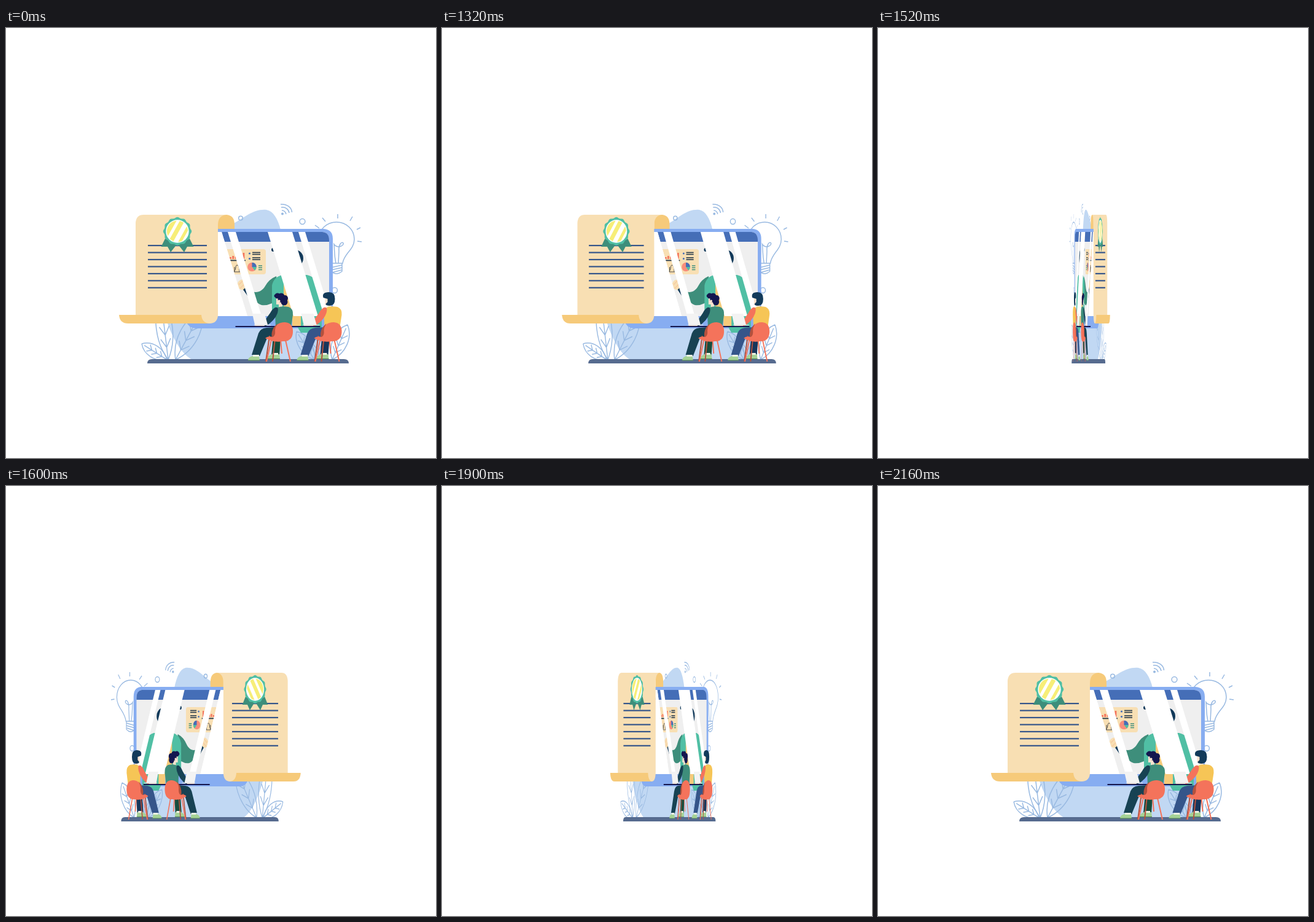
Animation, 700 px wide and 700 px high, one loop 3 s. Source, as an HTML page:

```html
<!DOCTYPE html>
<html lang="en">
<head>
<meta charset="utf-8">
<title>Online certificate</title>
<style>
html, body { margin: 0; width: 100%; height: 100%; overflow: hidden; background: #fff; }
svg { display: block; width: 100vw; height: 100vh; }
</style>
</head>
<body>
<svg viewBox="0 0 700 700"><g id="scene"></g></svg>
<script>
const C = {
  line: '#98b9e1', pale: '#c1d8f3', frame: '#87adf1', header: '#456eb7', screen: '#efefef',
  cream: '#f8dfb3', gold: '#f6ca7a', teal: '#50bfa4', green: '#3e8e7b', navy: '#35558a',
  ink: '#14174f', deep: '#174253', hair: '#123a5a', red: '#f4735b', rust: '#b4513d',
  yellow: '#f6c556', shoe: '#a5d296', ground: '#566b8f', skin: '#fbe3cf'
};

const fill = (d, color) => `<path d="${d}" fill="${color}"/>`;
const stroke = (d, color, width = 1.5) =>
  `<path d="${d}" fill="none" stroke="${color}" stroke-width="${width}"/>`;
const disc = (x, y, r, color) => `<circle cx="${x}" cy="${y}" r="${r}" fill="${color}"/>`;
const ring = (x, y, r) =>
  `<circle cx="${x}" cy="${y}" r="${r}" fill="none" stroke="${C.line}" stroke-width="1.5"/>`;
const rect = (x, y, w, h, color, r = 0) =>
  `<rect x="${x}" y="${y}" width="${w}" height="${h}" rx="${r}" fill="${color}"/>`;

// Outlined leaf from base to tip, with paired veins
function leaf(tx, ty, bx, by, width) {
  const dx = tx - bx, dy = ty - by, len = Math.hypot(dx, dy);
  const at = (along, side) =>
    `${(bx + dx * along - dy / len * side).toFixed(1)} ${(by + dy * along + dx / len * side).toFixed(1)}`;
  let d = `M${at(0, 0)}L${at(.9, 0)}`;
  for (const s of [-1, 1]) {
    d += `M${at(0, 0)}C${at(.3, s * width * 1.35)} ${at(.75, s * width * 1.35)} ${at(1, 0)}`;
    for (const a of [.2, .4, .6]) d += `M${at(a, 0)}L${at(a + .14, s * width * .62)}`;
  }
  return stroke(d, C.line);
}

function backdrop() {
  return fill('M262 478C273 510 287 531 303 540H522V400H454C454 345 446 300 424 296C403 294 388 309 366 321V478Z', C.pale) +
    leaf(221, 514, 262, 540, 10) + leaf(252, 440, 264, 540, 13) + leaf(318, 462, 276, 540, 15) +
    leaf(473, 494, 502, 540, 10) + leaf(503, 465, 510, 540, 12) + leaf(556, 483, 531, 540, 12) +
    ring(382, 309.5, 3.3) + ring(482.5, 315, 4.4) + ring(535, 427, 4.4) +
    disc(450, 302.5, 2, C.line) +
    stroke('M447 287C457 286 465 292 465.5 300M448 292C455 291 460 295 461 301M449 297C453 297 455 299 456 303', C.line) +
    stroke('M529 383C528 369 509 362 509 344C509 328 522 316 538 316C554 316 567 328 567 344C567 361 550 367 548 383Z', C.line) +
    stroke('M537 383C534 368 535 361 534 352C540 360 551 354 549 350C546 347 541 353 542 364L541 383', C.line) +
    stroke('M529 383V396Q538 404 547 396V383M529 390L547 386M529 394L547 390M531 398L546 394', C.line) +
    stroke('M540 303V310M515 309L520 315M564 307L560 314M503 321L510 326M571 328L577 325M572 347L579 348', C.line);
}

// Slanted glare band crossing the display
const SLANT = 42;
const glare = (x1, x2) => fill(`M${x1} 332H${x2}L${x2 + SLANT} 469H${x1 + SLANT}Z`, '#fff');

function presenter() {
  return disc(470, 375, 14, C.hair) + disc(435, 361, 3, C.hair) +
    disc(385, 418, 8.5, C.cream) + stroke('M379 418L388 409M381 424L392 413', '#f6c9a0', 1.4) +
    fill('M386 426L394 419L404 434L396 440Z', C.hair) +
    fill('M393 425C406 434 416 430 422 420Q428 409 440 404L446 440Q430 453 416 451Q404 447 393 425Z', C.green) +
    fill('M433 419Q436 405 450 402H490Q510 406 514 440V496H480L474 486H433Z', C.teal) +
    fill('M452 408L480 420V487H466L452 466Z', C.gold);
}

function monitor() {
  const text = [365.5, 368.5, 374, 377].map(y => rect(401, y - .8, 13, 1.6, '#26394a')).join('');
  const bars = [3, 5, 4, 8, 6, 10].map((h, i) => rect(364 + i * 4.3, 376 - h, 2.8, h, C.red)).join('');
  return fill('M300 327H517Q532 328 532 343V474Q531 489 516 489H309Q296 488 293 476V469H300Z', C.frame) +
    fill('M300 332H515Q526 333 526 345V469H300Z', C.screen) +
    fill('M300 332H515Q526 333 526 345V348H300Z', C.header) +
    rect(350, 360, 73, 41, C.cream, 4) + bars + rect(364, 377.5, 26, 1.8, '#26394a') +
    text + disc(396.5, 367, 1.6, C.header) + disc(396.5, 375.5, 1.6, C.header) +
    stroke('M370 397H383M371 396C375 394 373 386 376 386C380 386 379 394 382 396M372 389V397M380 387V397', '#4a4a48', 1) +
    disc(400.5, 389, 7.3, '#f98d7b') + fill('M400.5 389V381.7A7.3 7.3 0 0 1 407.8 389Z', C.header) +
    fill('M400.5 389H407.8A7.3 7.3 0 0 1 405 394.7Z', C.teal) +
    [386.3, 389.5, 392.7].map(y => rect(411, y, 6, 1.5, C.green)).join('') +
    presenter() + rect(400, 469, 66, 20, C.frame) +
    glare(340, 351) + fill(`M345 332V469H${351 + SLANT}L351 332Z`, '#fff') +
    glare(361, 374) + glare(426, 466) + glare(476, 487);
}

function medal() {
  let edge = '';
  for (let i = 0; i <= 72; i++) {
    const a = i / 72 * 2 * Math.PI, r = 22.3 + .9 * Math.cos(a * 12);
    edge += `${i ? 'L' : 'M'}${(279 + r * Math.sin(a)).toFixed(1)} ${(331 - r * Math.cos(a)).toFixed(1)}`;
  }
  return fill('M259 343L252.5 356L263 356L268 365L279 351Z', C.green) +
    fill('M299 343L305.5 356L295 356L290 365L279 351Z', C.green) +
    fill(edge + 'Z', C.teal) + disc(279, 331, 18.7, '#fff') +
    '<clipPath id="face"><circle cx="279" cy="331" r="17.2"/></clipPath><g clip-path="url(#face)">' +
    stroke('M256 343L274 311', '#f7ee78', 9) + stroke('M267 350L288 312', '#f7ee78', 7) +
    stroke('M281 352L301 316', '#f7ee78', 5) + '</g>';
}

function certificate() {
  let rows = '';
  for (let i = 0; i < 7; i++) rows += rect(231, 353 + i * 11.45, 96, 2.2, C.navy);
  return fill('M345 304H359Q372 305 372 320V327H345Z', C.gold) +
    fill('M184 467H331V481H199Q185 481 184 467Z', C.gold) +
    fill('M211 317Q212 304 224 304H359Q345 305 345 321V466Q345 481 331 481Q319 480 318 467H211Z', C.cream) +
    rows + medal();
}

// Seated learner facing left, drawn at the left seat
function learner(x, p) {
  return `<g transform="translate(${x})">` +
    fill('M435 500L448 494L445 533H432Z', p.farLeg) +
    fill('M456 486L459 499Q450 505 425 505L413 534L400 532L411 497Q414 489 424 488Z', p.leg) +
    fill('M394 541Q394 536 401 534L412 535L413 541Z', C.shoe) +
    fill('M425 539Q427 533 433 531L445 531L446 538Z', C.shoe) +
    fill('M402 532H412V535H402ZM434 529H443V532H434Z', '#eef3e4') +
    stroke('M394 541H413M425 538.5H446', '#52884f', 1) +
    fill('M440 438H450V455H444V450H440Z', C.skin) +
    fill('M442 455Q449 452 460 454Q468 457 467 467L464 487H439L438 466Z', p.body) +
    fill('M438 455Q445 453 442 464Q438 476 422 486L417 482L430 464Q433 458 438 455Z', p.arm) +
    fill('M405 483L419 481L421 485L406 486Z', C.skin) +
    fill('M401 465H421L426 483H405Z', '#f3f3f3') + stroke('M404 483.5H431', '#e3e1e2', 1.2) +
    p.hair + '</g>';
}

const chair = x => `<g transform="translate(${x})">` +
  stroke('M429 501L423 543M438 505L434 543', C.rust, 2) +
  stroke('M433 503L424 543M447 507L449 530M455 508L463 543', C.red, 2) +
  fill('M437 486Q431 494 433 504Q445 511 460 509L442 502Q437 492 442 481Z', C.rust) +
  fill('M438 493Q438 479 454 479Q468 480 467 496Q466 510 451 510Q436 513 422 505Q426 501 434 503Q439 501 438 493Z', C.red) +
  '</g>';

const curls = [[442, 436, 4.5], [448, 437, 5.5], [454, 440, 5], [453, 446, 5.5], [447, 442, 4.5], [439, 436, 2.5]]
  .map(c => disc(...c, C.ink)).join('') + disc(444.5, 444.5, 2, C.skin);
const crop = fill('M437 439Q435 433 440 431Q456 427 456 441Q456 452 448 452Q440 452 441 449L444 446V441Z', C.hair);

const scene = document.getElementById('scene');
scene.innerHTML =
  backdrop() + monitor() + certificate() +
  fill('M230 546Q230 539 238 539H550Q558 539 558 546Z', C.ground) +
  learner(0, { leg: C.deep, farLeg: '#174c3d', body: C.green, arm: C.deep, hair: curls }) +
  learner(79.5, { leg: C.navy, farLeg: '#17365b', body: C.yellow, arm: C.red, hair: crop }) +
  rect(373.5, 485, 138, 2, C.ink) + chair(0) + chair(79.5);

const LOOP = 3000, TICK = 20, MIDDLE = 1670, TURN = 1018;

// One full turn about the vertical axis, eased with a sine
function draw(now) {
  const t = Math.floor(now % LOOP / TICK) * TICK;
  const u = Math.min(1, Math.max(0, (t - MIDDLE) / TURN + .5));
  const angle = Math.PI * (1 - Math.cos(Math.PI * u));
  const scale = t < 1200 || t >= 2160 ? 1 : Math.cos(angle);
  scene.setAttribute('transform', `translate(350) scale(${scale.toFixed(4)} 1) translate(-350)`);
}

let start;
function loop(now) {
  start ??= now;
  draw(now - start);
  requestAnimationFrame(loop);
}
draw(0);
requestAnimationFrame(loop);
</script>
</body>
</html>
```
